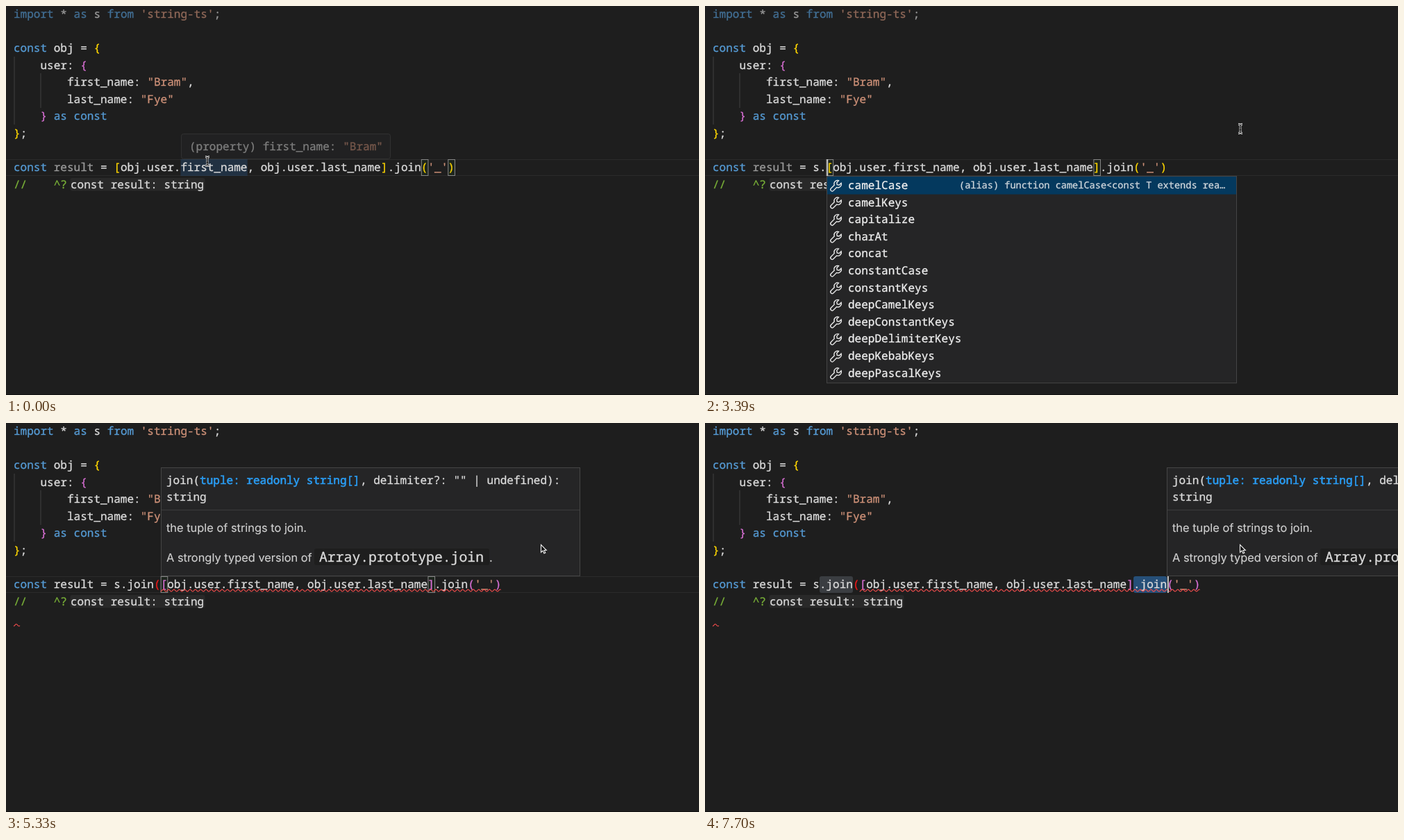
An HTML page for the animation above (8000 ms loop, 998x561 px).

```html
<!DOCTYPE html>
<html lang="en">
<head>
<meta charset="utf-8">
<title>Code editor</title>
<style>
  html, body { margin: 0; width: 100%; height: 100%; overflow: hidden; background: #1e1e1e; }
  svg { display: block; width: 998px; height: 561px; }
  text { white-space: pre; font: 16.03px "Noto Sans Mono", monospace; text-rendering: geometricPrecision; stroke-width: .3px; }
  text.prose { font: 16.4px Inter, sans-serif; stroke-width: .15px; }
  text.small { font-size: 13.6px; }
  text.big { font-size: 19.75px; }
  text.active { stroke-width: .6px; }
</style>
</head>
<body>
<svg id="stage" viewBox="0 0 998 561"></svg>
<script>
const LOOP = 8000, STEP = 148, CW = 9.62, LH = 24.6;
const INK = '#dcdcdc', KEY = '#569cd6', STR = '#ce9178', GOLD = '#ffd700', PINK = '#da70d6',
      RED = '#f01818', GREEN = '#79b038', ACTIVE = '#2a9df4', PANEL = '#252526', EDGE = '#454545';
const FIRST = '"Bram"', LAST = '"Fye"';
const FUNCS = ['camelCase', 'camelKeys', 'capitalize', 'charAt', 'concat', 'constantCase', 'constantKeys',
  'deepCamelKeys', 'deepConstantKeys', 'deepDelimiterKeys', 'deepKebabKeys', 'deepPascalKeys'];

// Each entry changes part of the editor state from its time on.
const SCRIPT = [
  [0, { typed: '', col: 66, on: 0, box: [61, 65], sel: null, hover: .5, unused: 1, list: 0,
        tip: '', fade: 1, arrow: 0, errors: 0 }],
  [148, { hover: 1 }],
  [440, { on: 1 }],
  [735, { hover: 0 }],
  [1005, { on: 0 }],
  [1305, { on: 1 }],
  [1755, { on: 0 }],
  [2055, { col: 15, on: 1, box: [15, 55] }],
  [2358, { on: 0 }],
  [3088, { typed: 's', col: 16, on: 1, box: [16, 56] }],
  [3238, { typed: 's.', col: 17, box: [17, 57] }],
  [3388, { list: 12 }],
  [3678, { typed: 's.j', col: 18, box: [18, 58], list: 1 }],
  [3828, { typed: 's.jo', col: 19, box: [19, 59] }],
  [4278, { typed: 's.join', col: 21, box: [21, 61], list: 0 }],
  [4728, { typed: 's.join(', col: 22, box: [22, 62], tip: 'tuple', fade: .5, unused: 0 }],
  [4878, { fade: 1, arrow: 1 }],
  [5028, { on: 0 }],
  [5328, { errors: 1 }],
  [5478, { col: 73, on: 1, box: [68, 72] }],
  [5928, { col: 70, sel: [70, 73], box: null, tip: 'separator', fade: .6 }],
  [6073, { fade: 1, arrow: 0 }],
  [6218, { col: 68, sel: [68, 73] }],
  [6368, { col: 64, sel: [64, 73], tip: 'tuple', arrow: 1 }],
  [6668, { col: 63, sel: [63, 73] }],
  [6808, { sel: null, box: [22, 62] }],
  [6958, { on: 0 }],
  [7258, { on: 1, col: 65, sel: [63, 65], box: null }],
  [7408, { col: 66, sel: [63, 66] }],
  [7558, { col: 67, sel: [63, 67] }],
  [7698, { col: 68, sel: [63, 68] }]
];

// Mouse way points: time, x, y.
const PATH = [[0, 290, 224], [740, 268, 262], [1036, 250, 258], [1184, 250, 258],
  [2220, 157, 235], [2664, 771, 177], [LOOP, 771, 177]];

const X = col => 11 + col * CW;
const Y = row => 16.7 + row * LH;
const esc = s => s.replace(/&/g, '&amp;').replace(/</g, '&lt;');
const rect = (x, y, w, h, fill, more = '') =>
  `<rect x="${x}" y="${y}" width="${w}" height="${h}" fill="${fill}" ${more}/>`;
const text = (x, y, s, fill = INK, cls = '') =>
  `<text x="${x}" y="${y}" fill="${fill}" stroke="${fill}" class="${cls}">${esc(s)}</text>`;
const path = (d, stroke, width, fill = 'none') =>
  `<path d="${d}" stroke="${stroke}" stroke-width="${width}" fill="${fill}"/>`;
const group = (opacity, body) => `<g opacity="${opacity}">${body}</g>`;

// Monospaced run of pieces: [string, colour, class].
function run(x, y, ...parts) {
  let out = '';
  for (const [s, fill, cls] of parts) {
    out += text(x, y, s, fill, cls);
    x += s.length * CW;
  }
  return out;
}
const code = (col, row, ...parts) => run(X(col), Y(row), ...parts);

function wave(x, end, y) {
  let d = `M${x} ${y + 1.5}`;
  for (let i = 1; x + i <= end; i++)
    d += `L${x + i} ${(y + 1.5 * Math.cos(i * 2 * Math.PI / 7.7)).toFixed(2)}`;
  return path(d, '#f14c4c', 1.1);
}

function header(s) {
  const line = code(0, 0, ['import', KEY], [' * '], ['as', KEY], [' s '], ['from', KEY],
    [" 'string-ts'", STR], [';']);
  return group(s.unused ? .65 : 1, line) +
    code(0, 2, ['const', KEY], [' obj = '], ['{', GOLD]) +
    code(4, 3, ['user: '], ['{', PINK]) +
    code(8, 4, ['first_name: '], [FIRST, STR], [',']) +
    code(8, 5, ['last_name: '], [LAST, STR]) +
    code(4, 6, ['}', PINK], [' as const', KEY]) +
    code(0, 7, ['}', GOLD], [';']) +
    rect(11.5, 73, 1, 98, '#404040') + rect(49.5, 97, 1, 50, '#404040');
}

function resultLine(s) {
  const open = s.typed.endsWith('('), pair = open ? PINK : GOLD;
  const shade = (a, b, fill) => rect(X(a), 221, (b - a) * CW, 24, fill, 'rx="3"');
  let out = '';
  if (s.sel) {
    out += shade(...s.sel, '#264f78');
    if (s.sel[1] <= 68) out += shade(16, 16 + s.sel[1] - s.sel[0], '#3a3d41');
  } else {
    out += rect(0, 221, 998, 1, '#2b2b2b') + rect(0, 244, 998, 1, '#2b2b2b');
  }
  if (s.hover) out += rect(X(25), 221, 10 * CW, 24, '#264f78', 'opacity=".4"');
  for (const c of s.box || [])
    out += rect(X(c) + .5, 221.5, CW, 23, '#1d251d', 'stroke="#888"');
  out += code(0, 9, ['const', KEY]) + group(s.unused ? .65 : 1, code(6, 9, ['result'])) +
    code(13, 9, ['= '], [s.typed.replace('(', '')], [open ? '(' : '', RED], ['[', pair],
      ['obj.user.first_name, obj.user.last_name'], [']', pair], ['.join'],
      ['(', pair], ["'_'", STR], [')', pair]);
  if (s.errors) out += wave(X(22), X(73), 241.5) + wave(11, 20.5, 291.5);
  if (s.on) out += rect(X(s.col) + .7, 221, 2, 24, '#c8c8c8');
  return out;
}

const comment = () => code(0, 10, ['//    ^?', GREEN]) +
  rect(92.5, 248, 194, 18.5, '#292929', 'rx="3"') + text(93, Y(10), 'const result: string');

function hoverCard(s) {
  return group(s.hover, rect(252.5, 184.5, 301, 36, PANEL, `stroke="${EDGE}" rx="3"`) +
    run(264, 207.7, ['(property) first_name: '], [FIRST, STR]));
}

function wrench(x, y) {
  const d = 'M10.4 2.2a4 4 0 0 0-5 5.2L1.6 11.2a1.9 1.9 0 0 0 2.7 2.7l3.8-3.8a4 4 0 0 0 5.2-5L11 7.4 8.6 7l-.4-2.4z';
  return `<g transform="translate(${x} ${y}) scale(1.25)">${path(d, '#e8e8e8', 1.1)}</g>`;
}

function suggestions(s) {
  const x = Math.round(X(s.col)), names = s.list > 1 ? FUNCS : ['join'];
  const hit = s.typed.length - 2;
  let out = rect(x + .5, 245.5, 590, s.list * LH + 3, PANEL, `stroke="${EDGE}"`);
  names.forEach((name, i) => {
    const y = 247 + i * LH;
    if (!i) out += rect(x + 1, y - 1, 589, LH + 1, '#04395e') +
      text(x + 191, y + 16.3, `(alias) function ${name}<const T extends readonly…`.slice(0, 46) + '…', '#d3d9de', 'small');
    out += wrench(x + 4.5, y + 2) + run(x + 31, y + 17, [name.slice(0, hit), '#2aaaff'], [name.slice(hit), '#f0f0f0']);
  });
  return out;
}

function signature(s) {
  const x = Math.round(X(s.col)), tx = x + 8, tuple = s.tip === 'tuple', top = tuple ? 64 : -2;
  const prose = (y, str) => text(tx, y, str, '#d0d0d0', 'prose');
  let out = rect(x + .5, top + .5, 603, 220 - top, PANEL, `stroke="${EDGE}"`) +
    rect(x + 1, tuple ? 125 : 35, 602, 1, '#3c3c3c');
  if (tuple) {
    out += run(tx, 87.6, ['join('], ['tuple: readonly string[]', ACTIVE, 'active'],
        [', delimiter?: "" | undefined):']) +
      run(tx, 112, ['string']) + prose(157, 'the tuple of strings to join.') +
      prose(200, 'A strongly typed version of') +
      rect(x + 221, 181, 252, 24, '#1e1e1e', 'rx="3"') +
      text(x + 228, 200, 'Array.prototype.join', INK, 'big') +
      text(x + 473, 200, '.', '#d0d0d0', 'prose');
  } else {
    out += run(tx, 22, ['join('], ['separator?: string | undefined', ACTIVE, 'active'], ['): string']) +
      ['A string used to separate one element of the array from the next in the',
       'resulting string. If omitted, the array elements are separated with a',
       'comma.'].map((str, i) => prose(66.5 + i * 30.7, str)).join('') +
      prose(169.5, 'Adds all the elements of an array into a string, separated by the specified') +
      prose(200, 'separator string.');
  }
  return group(s.fade, out);
}

function pointer(s, [x, y]) {
  if (s.arrow) return path('M770.5 175.5v11l2.6-2.3 1.8 3.9 1.9-.9-1.7-3.7h3.2z', '#f2f2f2', 1.1, '#111');
  const d = `M${x - 3} ${y - 6.5}q3 0 3 2.2v8.6q0 2.2-3 2.2M${x + 3} ${y - 6.5}q-3 0-3 2.2v8.6q0 2.2 3 2.2M${x - 1.6} ${y + 1.5}h3.2`;
  return path(d, '#f0f0f0', 2.8) + path(d, '#161616', 1);
}

function mouseAt(t) {
  const now = Math.floor((t + 18) / STEP) * STEP;
  let i = 0;
  while (i < PATH.length - 2 && now >= PATH[i + 1][0]) i++;
  const [t0, x0, y0] = PATH[i], [t1, x1, y1] = PATH[i + 1];
  const u = Math.min(1, (now - t0) / (t1 - t0)), k = u * u * (3 - 2 * u);
  return [x0 + (x1 - x0) * k, y0 + (y1 - y0) * k];
}

const stateAt = t => Object.assign({}, ...SCRIPT.filter(e => e[0] <= t).map(e => e[1]));

const stage = document.getElementById('stage');
let shown = '';

function draw(t) {
  const s = stateAt(t);
  const view = rect(0, 0, 998, 561, '#1e1e1e') + header(s) + resultLine(s) + comment() +
    (s.hover ? hoverCard(s) : '') + (s.list ? suggestions(s) : '') + (s.tip ? signature(s) : '') +
    pointer(s, mouseAt(t)) + rect(0, 560, 998, 1, '#121212');
  if (view !== shown) stage.innerHTML = shown = view;
}

const start = performance.now();
function tick() {
  draw((performance.now() - start) % LOOP);
  requestAnimationFrame(tick);
}
tick();
</script>
</body>
</html>
```
